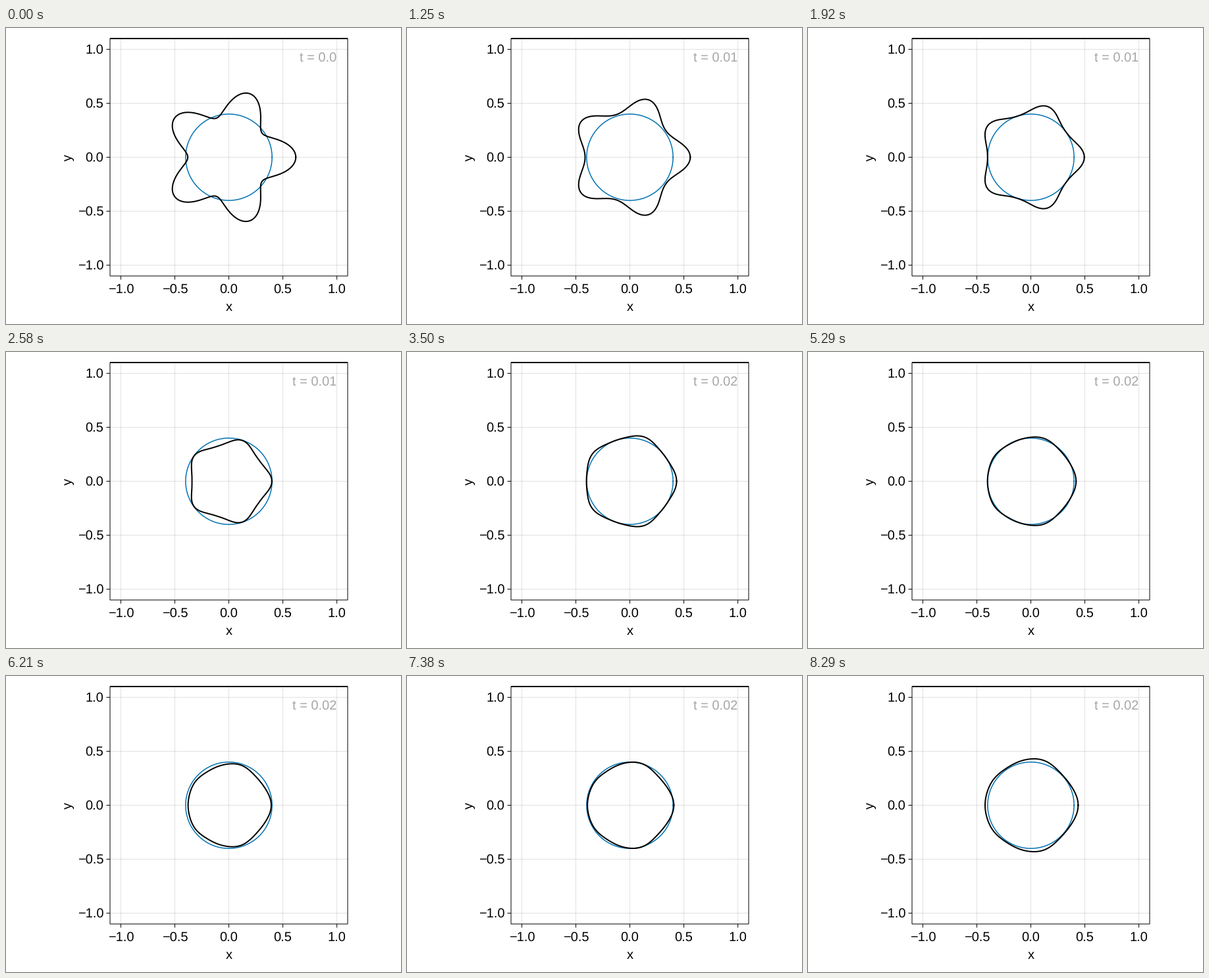
Write a matplotlib script that moves like this. It is 600x450 px and loops after 8.33 s.

```python
import numpy as np
import matplotlib.pyplot as plt
from matplotlib.animation import FuncAnimation
from matplotlib.lines import Line2D

W, H, DPI = 600, 450, 100
FRAMES, LOOP_MS = 200, 8330
LEFT, RIGHT, TOP, BOTTOM = 158, 519, 16, 377
CX, CY, UNIT = 338.5, 196.5, 361 / 2.2
TURN = 62  # step at which the first collapse reverses
RADIUS = 0.4


def pt(px):
    return px * 72 / DPI


plt.rcParams["font.family"] = "Liberation Sans"
plt.rcParams["font.size"] = pt(20)
plt.rcParams["text.hinting"] = "none"

theta = np.linspace(0, 2 * np.pi, 181)


def axis_radius(k):
    """Mean radius: accelerating collapse, then a bouncing oscillation."""
    if k <= TURN:
        return 0.5 - 0.1375 * (k / TURN) ** 3.25
    cycles = np.interp(k, [TURN, 105, 149, 177, 199], [0.5, 3.69, 6.665, 8.241, 9.96])
    wave = np.arcsin(0.98 * np.cos(2 * np.pi * cycles)) / np.arcsin(0.98)
    return 0.3985 + 0.0355 * wave


def lobe_size(k):
    if k <= TURN:
        return 0.12 * np.exp(-0.01027 * k - 0.0002175 * k**2)
    return 0.007 + 0.0205 * np.exp((TURN - k) / 25)


def outline(k):
    lobe = lobe_size(k)
    flat = 0.13 * lobe * (1 - np.exp(-k / 25))  # widens the dents between lobes
    square = 0.01 * np.clip((k - TURN) / 120, 0, 1)
    r = (axis_radius(k) + lobe * np.cos(5 * theta)
         - flat * (1 - np.cos(10 * theta))
         - square * (1 - np.cos(4 * theta)))
    return r * np.cos(theta), r * np.sin(theta)


def clock(k):
    t = np.interp(k, [0, 75, 199], [0, 0.0151, 0.021])
    return f"t = {round(float(t), 2)}"


fig = plt.figure(figsize=(W / DPI, H / DPI), dpi=DPI, facecolor="white")
ax = fig.add_axes([LEFT / W, 1 - BOTTOM / H, (RIGHT - LEFT) / W, (BOTTOM - TOP) / H])
ax.set(xlim=(-1.1, 1.1), ylim=(-1.1, 1.1))
ax.axis("off")


def label(x, y, text, **kw):
    """Place text at pixel coordinates measured from the top left."""
    return fig.text(x / W, 1 - y / H, text, **kw)


def rule(xs, ys, **kw):
    """Draw an unsnapped one pixel line through top-left pixel coordinates."""
    line = Line2D(np.array(xs) / W, 1 - np.array(ys) / H, transform=fig.transFigure,
                  linewidth=pt(1), solid_capstyle="butt",
                  solid_joinstyle="miter", **kw)
    line.set_snap(False)
    fig.add_artist(line)


for v in np.linspace(-1, 1, 5):
    name = f"{v:.1f}".replace("-", "\u2212")
    x, y = CX + UNIT * v, CY - UNIT * v
    rule([x, x], [TOP, BOTTOM], color="black", alpha=0.12, zorder=-2)
    rule([LEFT, RIGHT], [y, y], color="black", alpha=0.12, zorder=-2)
    rule([x, x], [BOTTOM, BOTTOM + 5.5], color="black")
    rule([LEFT - 5.5, LEFT], [y, y], color="black")
    label(x, 404, name, ha="center", va="baseline")
    label(148.5, y + 7, name, ha="right", va="baseline")
rule([LEFT, RIGHT, RIGHT, LEFT, LEFT, RIGHT], [TOP, TOP, BOTTOM, BOTTOM, TOP, TOP],
     color="black")
label(CX, 430, "x", ha="center", va="baseline")
label(95, CY, "y", ha="center", va="center", rotation=90)

fine = np.linspace(0, 2 * np.pi, 361)
ax.plot(RADIUS * np.cos(fine), RADIUS * np.sin(fine), color="#0072B2",
        linewidth=pt(1.5), zorder=3)
curve, = ax.plot([], [], color="black", linewidth=pt(2), zorder=4,
                 solid_joinstyle="round")
timer = label(502.6, 51.5, "", ha="right", va="baseline", color="#a6a6a6")


def update(k):
    curve.set_data(*outline(k))
    timer.set_text(clock(k))
    return curve, timer


anim = FuncAnimation(fig, update, frames=FRAMES, interval=LOOP_MS / FRAMES,
                     repeat=True, repeat_delay=0, blit=False)
plt.show()
```
